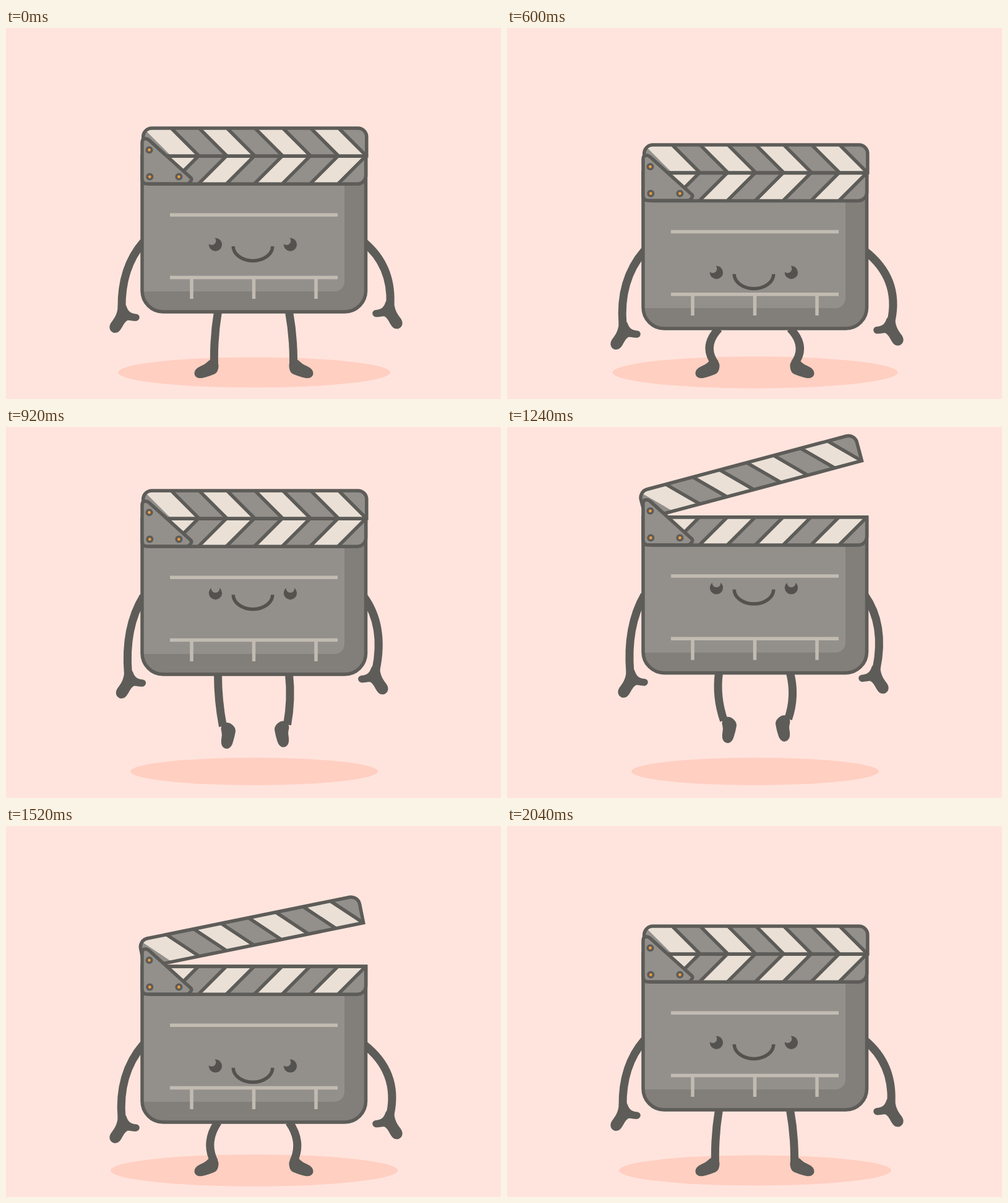
An HTML page for the animation above (2600 ms loop, 800 by 600 pixels).

```html
<!DOCTYPE html>
<html lang="en">
<head>
<meta charset="utf-8">
<title>Jumping clapperboard</title>
<style>
  html, body { margin: 0; width: 100%; height: 100%; overflow: hidden; background: #ffe4dd; }
  svg { display: block; width: 100vw; height: 100vh; }
  .line { fill: none; stroke: #5d5c58; stroke-width: 5.5; }
  .limb { fill: none; stroke: #5d5c58; stroke-width: 13; }
  .dark { fill: #5d5c58; }
  .gray { fill: #93908c; }
  .cream { fill: #eae0d6; }
  .chalk { fill: none; stroke: #c2bbb2; stroke-width: 5.5; }
</style>
</head>
<body>
<svg viewBox="0 0 800 600">
  <defs>
    <path id="bar" d="M221.7 207V176a14 14 0 0 1 14-14H568.8a14 14 0 0 1 14 14V207Z"/>
    <clipPath id="barClip"><use href="#bar"/></clipPath>
    <g id="stripes">
      <g id="bands" clip-path="url(#barClip)"><use href="#bar" class="gray"/></g>
      <use href="#bar" class="line"/>
    </g>
    <path id="hand" class="dark" d="M-6-4C-7 8-10 14-16 22C-24 32-17 40-11 40C0 40 0 26 9 20C13 19 17 21 23 21C30 20 31 11 24 9.5C17 9 11 7 8-2C6-9-5-10-6-4Z"/>
    <path id="foot" class="dark" d="M-7-6C-10-5-13 0-18 2C-27 6-32 9-32 16C-31 23-24 24-19 23C-11 21-8 20-3 18C5 16 7 10 7 2C6-4 2-9-7-6Z"/>
    <g id="screw"><circle r="6" class="dark"/><circle r="2.4" fill="#f09a3a"/></g>
    <g id="eye"><circle r="10.6" fill="#54524e"/><circle id="glint" class="gray" r="6.8"/></g>
  </defs>

  <ellipse id="shadow" cx="401" cy="557" fill="#ffcfc1"/>
  <g class="side"><path class="limb arm"/><path class="limb leg"/><use href="#hand" class="palm"/><use href="#foot" class="shoe"/></g>
  <g class="side" transform="matrix(-1 0 0 1 800 0)"><path class="limb arm"/><path class="limb leg"/><use href="#hand" class="palm"/><use href="#foot" class="shoe"/></g>

  <g id="body">
    <path fill="#827e7a" d="M220 207V425a34 34 0 0 0 34 34H547.5a34 34 0 0 0 34-34V207Z"/>
    <path class="gray" d="M220 207H547V410a16 16 0 0 1-16 16H220Z"/>
    <path class="chalk" d="M265 302.3H536M265 403.6H536M300 403V438M400.5 403V438M501 403V438"/>
    <path class="line" d="M220 207V425a34 34 0 0 0 34 34H547.5a34 34 0 0 0 34-34V207Z"/>
    <use href="#stripes" transform="matrix(1 0 0 -1 -1.2 414.3)"/>
    <use href="#stripes" id="lid"/>
    <path class="line" style="fill:#93908c" d="M220 244V185Q220 179 225 179Q229 179 232 182L299 242.5Q301 245 298 248.5Q296 252 292 252H228Q220 252 220 244Z"/>
    <use href="#screw" x="231.5" y="197.2"/>
    <use href="#screw" x="232.3" y="240.6"/>
    <use href="#screw" x="279.4" y="240.6"/>
    <g id="face">
      <use href="#eye" x="338.5" y="350.3"/>
      <use href="#eye" x="459.5" y="350.3"/>
      <path d="M367.2 353A31.8 23.4 0 0 0 430.8 353" fill="none" stroke="#54524e" stroke-width="5.5"/>
    </g>
  </g>
</svg>
<script>
const $ = s => document.querySelector(s);
const set = (el, attrs) => { for (const k in attrs) el.setAttribute(k, attrs[k]); };

// Slanted bands, alternating cream and gray
const step = 45.1;
let bands = '';
for (let x = 267 - step; x < 560; x += 2 * step) bands += `<path class="cream" d="M${x} 162h${step}l45 45h${-step}Z"/>`;
for (let x = 267; x < 560; x += step) bands += `<path class="line" d="M${x - 3} 159l51 51"/>`;
$('#bands').insertAdjacentHTML('beforeend', bands);

// Easing between times a and b
const ramp = (a, b, t) => Math.min(1, Math.max(0, (t - a) / (b - a)));
const smooth = (a, b, t) => { const u = ramp(a, b, t); return u * u * (3 - 2 * u); };
const pulse = (a, b, t) => Math.sin(Math.PI * ramp(a, b, t)) ** 2;

// Crouch, ballistic hop, cushioned landing
const hop = t => 78.6 * Math.max(0, 1 - ((t - 1085) / 331) ** 2);
const crouch = t => 32 * (smooth(200, 500, t) - ramp(500, 755, t) ** 2);
const landing = t => 20 * (1 - (1 - ramp(1416, 1500, t)) ** 2 - smooth(1500, 2040, t));
const drop = t => crouch(t) + landing(t) - hop(t);

const tense = t => smooth(200, 470, t) - smooth(1520, 2000, t);
const air = t => smooth(720, 980, t) - smooth(1280, 1500, t);
const curl = t => smooth(640, 920, t) - smooth(1240, 1430, t);
const tuck = t => 9 * pulse(640, 880, t) + 7 * pulse(1090, 1416, t);
const open = t => 20.2 * (smooth(920, 1400, t) - smooth(1400, 1665, t));
const shade = t => 220 + 12 * tense(t) - 32 * (smooth(560, 860, t) - smooth(1260, 1500, t));

const sides = [...document.querySelectorAll('.side')];

// The right side is mirrored, with a wider arm and a slightly higher foot
function drawSide(el, right, t) {
  const part = c => el.querySelector(c);
  const dy = drop(t), raise = -13 * tense(t), fold = curl(t);

  const sy = 346 + dy + raise;
  const wx = right ? 179 + 24 * air(t + 30) : 187 + 12 * air(t);
  const wy = 453 + dy - 19 * pulse(200, 520, t) + 6 * air(t) - 6.5 * right;
  const bulge = right ? 3 - 0.9 * raise : 1 - 0.4 * raise;
  set(part('.arm'), { d: `M222 ${sy}Q${wx - bulge} ${(sy + wy) / 2 - 12} ${wx} ${wy}` });
  set(part('.palm'), { transform: `translate(${wx} ${wy})` });

  const hx = 342.5, hy = 459 + dy;
  const ax = 336.5 + 14 * fold - right * (1 + 4 * fold);
  const ay = 543 - hop(t) - tuck(t) - right * 2.5 * fold;
  const bend = Math.max(0, 4 + 0.75 * (84 - (ay - hy)));
  set(part('.leg'), { d: `M${hx} ${hy}Q${(hx + ax) / 2 - bend} ${(hy + ay) / 2} ${ax} ${ay}` });
  set(part('.shoe'), { transform: `translate(${ax + 6 * fold} ${ay}) rotate(${-58 * fold})` });
}

function draw(t) {
  const rx = shade(t), gx = 6 * curl(t) - 6;
  set($('#shadow'), { rx, ry: rx * 0.1115 });
  set($('#body'), { transform: `translate(0 ${drop(t)})` });
  set($('#lid'), { transform: `rotate(${-open(t)} 231.5 197.2)` });
  set($('#face'), { transform: `translate(0 ${18 * tense(t) - 47 * air(t)})` });
  set($('#glint'), { cx: gx, cy: -7.5 - gx / 4 });
  sides.forEach((el, i) => drawSide(el, i, t));
}

const start = performance.now();
function tick() {
  const t = (performance.now() - start) % 2600;
  draw(Math.floor(t / 40) * 40);
  requestAnimationFrame(tick);
}
tick();
</script>
</body>
</html>
```
